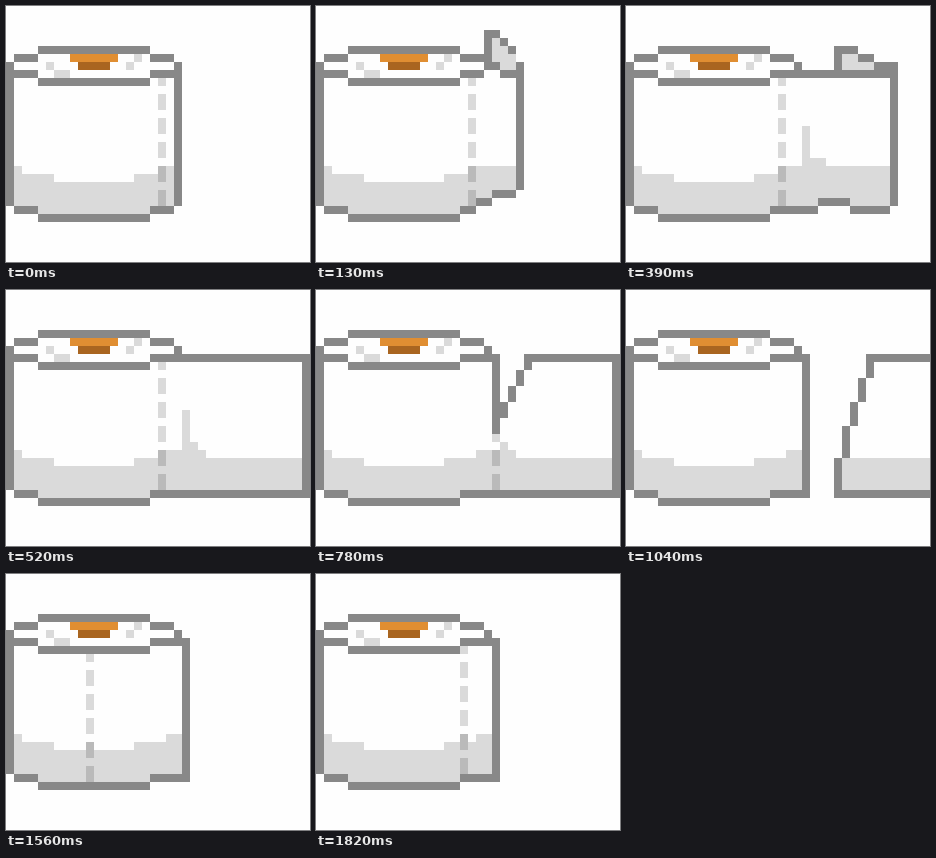
Animation, 304 px wide and 256 px high, one loop 1.95 s. Source, as an HTML page with a canvas:

```html
<!DOCTYPE html>
<html lang="en">
<head>
<meta charset="utf-8">
<title>Paper roll</title>
<style>
  html, body { margin: 0; width: 100%; height: 100%; overflow: hidden; background: #fefefe; }
  canvas { display: block; width: 304px; height: 256px; }
</style>
</head>
<body>
<canvas id="stage" width="304" height="256"></canvas>
<script>
const ctx = document.getElementById('stage').getContext('2d');
const CELL = 8, STEP = 130, STEPS = 15;
const WHITE = '#fefefe', LINE = '#888888', SHADE = '#dadada', DASH = '#bababa';

// All coordinates are in cells.
function box(color, x, y, w = 1, h = 1) {
  ctx.fillStyle = color;
  ctx.fillRect(x * CELL, y * CELL, w * CELL, h * CELL);
}

// A run is a list of [x, row] breaks: each row holds until the next break.
const rowAt = (run, x) => run.reduce((row, [from, y]) => (x >= from ? y : row), run[0][1]);

function roll(edge) {
  box(SHADE, 1, 20);
  box(SHADE, 20, 20, edge - 20);
  box(SHADE, 1, 21, 5);
  box(SHADE, 16, 21, edge - 16);
  box(SHADE, 1, 22, edge - 1, 3);
  box(SHADE, 4, 25, 14);

  box(LINE, 0, 7, 1, 18);
  box(LINE, 4, 5, 14);
  box(LINE, 4, 9, 14);
  box(LINE, 4, 26, 14);
  for (const y of [6, 8, 25]) box(LINE, 1, y, 3);
  box(LINE, 18, 6, 3);
  box(LINE, 21, 7);

  box('#e08e32', 8, 6, 6);
  box('#a96520', 9, 7, 4);
  box(SHADE, 16, 6);
  box(SHADE, 15, 7);
  box(SHADE, 5, 7);
  box(SHADE, 6, 8, 2);
}

function rollEdge(edge, top) {
  box(LINE, 18, 8, edge - 18);
  box(LINE, 18, 25, edge - 18);
  box(LINE, edge, top, 1, 25 - top);
  if (edge > 21) box(LINE, edge, 25);
}

// Dashes sit one cell lower on the front bulge of the roll.
function perforation(x, from = 0) {
  const drop = x >= 4 && x < 18 ? 1 : 0;
  for (let y = 8; y < 25; y += 3) {
    if (y < from) continue;
    const top = Math.max(y, 9);
    box(y >= 20 ? DASH : SHADE, x, top + drop, 1, y + 2 - top);
  }
}

function crease() {
  box(SHADE, 22, 15, 1, 4);
}

// The loose end while it is pulled out, with its curled back side.
function flap({ edge, back, front, bottom, foot }) {
  const left = back[0][0];
  for (let x = 18; x < edge; x++) {
    const f = rowAt(front, x), b = rowAt(bottom, x);
    box(WHITE, x, f, 1, b - f);
    const top = x < 19 ? 21 : 20;
    box(SHADE, x, top, 1, b - top);
    if (x >= left) {
      const k = rowAt(back, x);
      box(SHADE, x, k, 1, f - k);
      box(LINE, x, k);
    }
    box(LINE, x, f);
    box(LINE, x, b);
  }
  box(LINE, 21, 7);
  box(LINE, left, back[0][1], 1, rowAt(front, left) - back[0][1]);
  box(LINE, edge, 7, 1, rowAt(bottom, edge) - 7);
  if (edge > 27) {
    crease();
    box(SHADE, 22, 19, foot);
  }
}

function sheet(from, left, open = false) {
  box(SHADE, from, 21, 38 - from, 4);
  box(LINE, left, 8, 38 - left);
  box(LINE, from, 25, 38 - from);
  if (!open) box(LINE, 37, 8, 1, 18);
}

// Torn edge going down and to the left, one column per height.
function tornEdge(x, heights) {
  let y = 8;
  for (const h of heights) {
    box(LINE, x--, y, 1, h);
    y += h;
  }
}

function tearing(left, heights, depth) {
  roll(22);
  sheet(18, left);
  box(SHADE, 20, 20, 5);
  box(SHADE, 23, 19);
  box(SHADE, 22, 18);
  box(LINE, 18, 8, 5);
  box(LINE, 22, 8, 1, depth);
  tornEdge(left, heights);
  perforation(22, 8 + depth);
}

function pulling(shape) {
  roll(21);
  flap(shape);
  perforation(19);
}

function rest(edge, x) {
  roll(edge);
  rollEdge(edge, edge > 21 ? 8 : 7);
  perforation(x);
}

function leaving(from, left, heights) {
  roll(22);
  rollEdge(22, 8);
  sheet(from, left, true);
  tornEdge(left, heights);
}

const slant = [3, 3, 3, 4, 5];

const poses = [
  () => rest(21, 19),
  () => pulling({
    edge: 25, foot: 0,
    back: [[21, 3], [23, 4], [24, 5]],
    front: [[18, 8], [21, 7], [23, 8]],
    bottom: [[18, 25], [20, 24], [22, 23]]
  }),
  () => pulling({
    edge: 29, foot: 4,
    back: [[22, 4], [25, 5], [27, 6]],
    front: [[18, 8], [23, 7], [26, 8]],
    bottom: [[18, 25], [21, 24], [23, 23], [26, 24]]
  }),
  () => pulling({
    edge: 33, foot: 3,
    back: [[26, 5], [29, 6], [31, 7]],
    front: [[18, 8]],
    bottom: [[18, 25], [24, 24], [28, 25]]
  }),
  () => {
    roll(21);
    sheet(18, 18);
    box(SHADE, 19, 20, 6);
    box(SHADE, 22, 19, 2);
    crease();
    perforation(19);
  },
  () => tearing(24, [2, 2], 5),
  () => tearing(26, [2, 2, 2, 2], 10),
  () => leaving(23, 28, [3, 3, 3, 3, 3, 3]),
  () => leaving(26, 30, slant),
  () => leaving(32, 36, slant),
  ...[2, 6, 10, 14, 18].map(x => () => rest(22, x))
];

const start = performance.now();
let shown = -1;

function tick() {
  const i = Math.floor((performance.now() - start) / STEP) % STEPS;
  if (i !== shown) {
    shown = i;
    box(WHITE, 0, 0, 38, 32);
    poses[i]();
  }
  requestAnimationFrame(tick);
}
tick();
</script>
</body>
</html>
```
